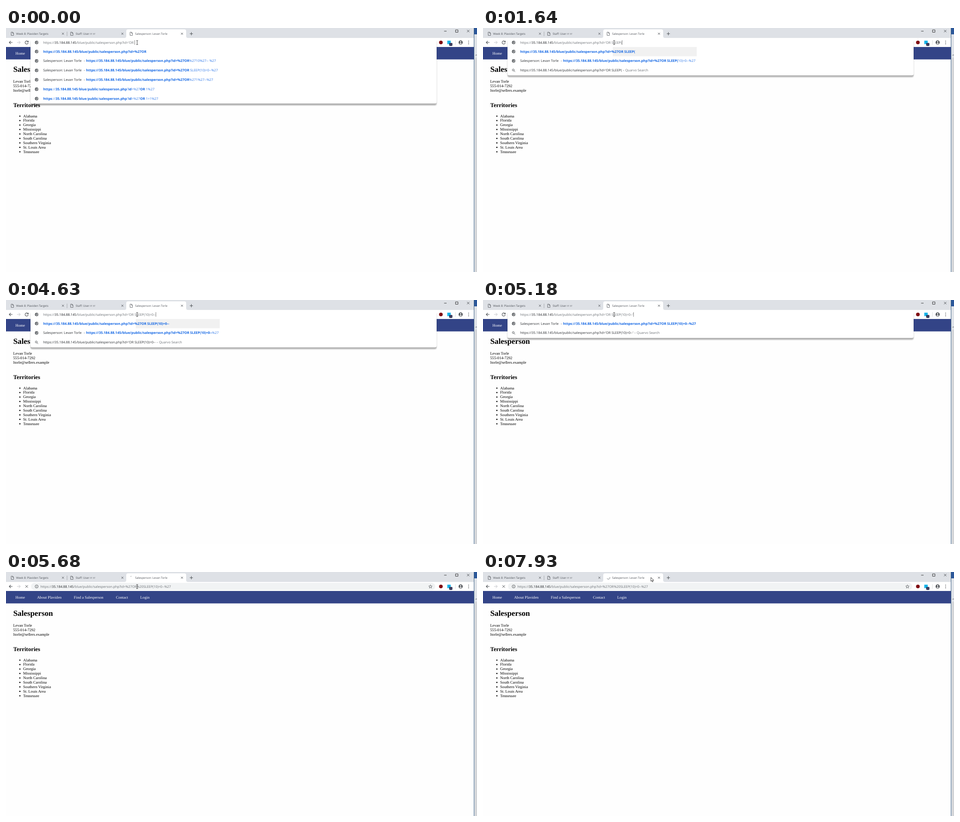
Animation, 1038 px wide and 540 px high, one loop 8000 ms. Source, as an HTML page:

```html
<!DOCTYPE html>
<html lang="en">
<head>
<meta charset="utf-8">
<title>Address bar typing</title>
<style>
html, body { margin: 0; width: 100%; height: 100%; overflow: hidden; background: #fefefe; }
svg { display: block; width: 1038px; height: 540px; }
text { white-space: pre; text-rendering: geometricPrecision; }
.ui { font-family: "Open Sans", "Noto Sans", sans-serif; font-size: 7.36px; fill: #2c2f33; }
.tab { font-family: "Open Sans", "Noto Sans", sans-serif; font-size: 6.2px; fill: #4c5056; }
.page { font-family: "Liberation Serif", "Times New Roman", serif; font-size: 8.65px; fill: #000; }
.nav { fill: #fff; }
.h1 { font-size: 17.3px; font-weight: bold; }
.h2 { font-size: 12.97px; font-weight: bold; }
.dim { fill: #6c7176; }
.host { fill: #202327; }
.link { fill: #3079e8; font-size: 7.42px; }
.hit { fill: #1266e4; font-size: 7.48px; font-weight: bold; }
.line { fill: none; stroke: #4b4f53; stroke-width: 1; }
</style>
</head>
<body>
<svg id="stage" viewBox="0 0 1038 540"></svg>
<script>
const LOOP = 8000, LOAD = 5560;
const PERSON = "Levan Torle", FIRM = "Plaviden";
const HOST = "35.184.88.145", PATH = "/blue/public/salesperson.php?id=";
const BASE = "https://" + HOST + PATH;
const TYPED = "'OR SLEEP(10)=0--'";
const ENCODED = encode(TYPED);

// time, typed characters, caret visible
const KEYS = [
  [0, 4, 1], [150, 5, 1], [290, 6, 1], [430, 7, 1], [560, 8, 1], [700, 9, 1],
  [1240, 9, 0], [1640, 10, 1], [2060, 11, 1], [2200, 12, 1], [2510, 13, 1],
  [2940, 13, 0], [3500, 13, 1], [3640, 14, 1], [3780, 15, 1],
  [4330, 15, 0], [4480, 16, 1], [4630, 17, 1], [5180, 18, 1]
];
// time, x, y, shape
const POINTER = [
  [0, 289, 32, "beam"], [7080, 293, 28, "beam"], [7220, 301, 17, "arrow"],
  [7360, 312, 5, "arrow"], [7490, 321, 1, "arrow"], [7630, 327, 9, "arrow"],
  [7780, 352, 38, "arrow"], [7930, 370, 12, "arrow"]
];
const TICKS = [5560, 5680, 5810, 5950, 6090, 6230, 6370, 6510, 6660,
  6800, 6940, 7080, 7220, 7360, 7490, 7630, 7780, 7930].map(t => [t]);

const at = (table, t) => table.filter(step => step[0] <= t).pop();
function encode(s) { return s.replace(/'/g, "%27"); }
const text = (x, y, cls, body) => `<text x="${x}" y="${y}" class="${cls}">${body}</text>`;
const rect = (x, y, w, h, fill, r = 0) =>
  `<rect x="${x}" y="${y}" width="${w}" height="${h}" rx="${r}" fill="${fill}"/>`;
const dot = (x, y, r, fill) => `<circle cx="${x}" cy="${y}" r="${r}" fill="${fill}"/>`;
const line = (d, extra = "") => `<path d="${d}" class="line" ${extra}/>`;
const span = (body, cls, x) => `<tspan class="${cls}"${x ? ` x="${x}"` : ""}>${body}</tspan>`;
const cross = (x, y, r) => line(`M${x - r} ${y - r}l${2 * r} ${2 * r}m0 ${-2 * r}l${-2 * r} ${2 * r}`);

const sheet = x => line(`M${x - 2.6} 9.2h3.3l2 2v5.2h-5.3zM${x + .5} 9.3v2.2h2.1`, 'style="stroke-width:.8"');
const globe = y => dot(67.5, y, 3.8, "#4b4f53") +
  `<path d="M64.7 ${y - .8}l2.2 1.6v1.9M66.6 ${y - 2.5}l1.6 1.2l2-.4M68.6 ${y + 2.4}l.3-1.9l1.7-.4"
    fill="none" stroke="#fff" stroke-width="1"/>`;
const lens = y => `<circle cx="66.7" cy="${y - .8}" r="2.1" class="line"/>` +
  line(`M68.2 ${y + .8}l2.6 2.6`);

function chrome() {
  const tabs = rect(0, 0, 1031, 22, "#dee1e6") +
    `<path d="M261 22q4 0 4-4v-11q0-4 4-4h124q4 0 4 4v11q0 4 4 4z" fill="#fff"/>` +
    sheet(14) + sheet(145) +
    text(22.3, 14.9, "tab", `Week 8: ${FIRM} Targets`) +
    text(153.5, 14.9, "tab", "Staff: User rr rr") +
    text(284.5, 14.9, "tab", `Salesperson: ${PERSON}`) +
    [125.5, 256.5, 387.8].map(x => cross(x, 12.6, 2)).join("") +
    rect(134, 8, .8, 10, "#9a9da2") +
    line("M405 12.7h7M408.5 9.2v7");
  const frame = line("M965.5 7h5.5M990.7 4.2h5.4v5.2h-5.4z", 'style="stroke:#222;stroke-width:.9"') +
    cross(1018.6, 6.8, 2.6);
  const bar = rect(0, 22, 1031, 20, "#fff") +
    line("M14.3 32h-7M10.5 28.6l-3.4 3.4l3.4 3.4", 'style="stroke-width:1.1"') +
    line("M24.4 32h7M28.2 28.6l3.4 3.4l-3.4 3.4", 'style="stroke:#bdc0c4"');
  const tools = dot(958.4, 32, 4.1, "#800f14") + rect(972.5, 28, 7.6, 7.6, "#18b4e8") +
    rect(977, 33.2, 6.6, 6.4, "#16163c", 1) +
    `<text x="978.9" y="38.4" class="ui" style="font-size:5px;fill:#fff">0</text>` +
    rect(990, 27, .8, 10, "#d5d7da") +
    dot(1002, 32, 4.5, "#4b4f53") + dot(1002, 30.5, 1.5, "#fff") +
    `<path d="M999.2 34.2q2.8-2.2 5.6 0q-2.8 2.8-5.6 0z" fill="#fff"/>` +
    [28.8, 32, 35.2].map(y => dot(1019.5, y, .85, "#4b4f53")).join("");
  return tabs + frame + bar + tools;
}

function page() {
  const links = [[20.8, "Home"], [68.4, `About ${FIRM}`], [149.5, "Find a Salesperson"],
    [242.2, "Contact"], [295.8, "Login"]];
  const places = ["Alabama", "Florida", "Georgia", "Mississippi", "North Carolina",
    "South Carolina", "Southern Virginia", "St. Louis Area", "Tennessee"];
  const contact = [PERSON, "555-014-7292", "ltorle@sellers.example"];
  return rect(0, 42, 1031, 27.5, "#334487") +
    links.map(([x, s]) => text(x, 59.4, "page nav", s)).join("") +
    text(16, 97.1, "page h1", "Salesperson") +
    contact.map((s, i) => text(15.8, 121.2 + 9.95 * i, "page", s)).join("") +
    text(16, 175.3, "page h2", "Territories") +
    places.map((s, i) => dot(30.6, 195.1 + 9.87 * i, 1.4, "#000") +
      text(37.8, 197.6 + 9.87 * i, "page", s)).join("");
}

function rightEdge() {
  return rect(1031, 0, 1, 540, "#3f6389") + rect(1032, 0, 6, 540, "#dfe3e8") +
    rect(1032, 0, 6, 14, "#2b579a") + rect(1033.5, 66, 4.5, 474, "#d2d4d7") +
    line("M1034.6 61l1.9-2l1.9 2", 'style="stroke-width:.9"');
}

const address = (x, query) => `<text id="url" x="${x}" y="34.5" class="ui">` +
  span("https://", "dim") + span(HOST, "host") + span(PATH + query, "dim") + "</text>";
const row = (i, icon, body) => icon(52 + 20.85 * i) + text(82, 54.6 + 20.85 * i, "ui", body);
const titled = (hit, rest) => `Salesperson: ${PERSON}` + span("–", "dim", 171) +
  span(hit, "hit", 176.5) + span(rest, "link");

// only words found in the query are bold
const words = rest => ["https", "://", HOST, "/", "blue", "/", "public", "/", "salesperson.php",
  "?", "id", "=%27", "OR", rest].map((s, i) => span(s, i % 2 ? "link" : "hit")).join("");

function suggestions(count) {
  const query = TYPED.slice(0, count);
  const code = encode(query);
  if (count === 4) {
    const hit = BASE + "%27OR";
    return [
      [globe, span(hit, "hit")],
      [globe, titled(hit, "%2710%27-- %27")],
      [globe, titled(hit, " SLEEP(10)=0--%27")],
      [globe, titled(hit, "%271%27--%27")],
      [globe, words(" 1%27")],
      [globe, words(" 1=1%27")]
    ];
  }
  const list = [
    [globe, titled(BASE + code, ENCODED.slice(code.length))],
    [lens, BASE + query + span(" – Quarvo Search", "dim")]
  ];
  if (count < TYPED.length) list.unshift([globe, span(BASE + code, "hit")]);
  return list;
}

function typing(count) {
  const list = suggestions(count);
  const shade = list.length === 3 ? rect(286, 42, 185, 20.5, "#f1f1f1") : "";
  return `<g filter="url(#shadow)">${rect(54, 24, 895, 18 + 20.83 * list.length, "#fff", 4)}</g>` +
    shade + globe(32) + address(82, TYPED.slice(0, count)) +
    list.map(([icon, body], i) => row(i, icon, body)).join("") +
    line("M48.5 30.2a3.5 3.5 0 1 0 .5 2.6M49.2 28.3v2.7h-2.8", 'style="stroke-width:1.1"') +
    sheet(276);
}

function loading() {
  return rect(55, 24, 891, 16, "#f1f3f4", 8) +
    '<circle cx="67.5" cy="32" r="3.4" class="line" style="stroke-width:.9"/>' +
    line("M67.5 31.4v2.4M67.5 29.8v.8", 'style="stroke-width:.9"') +
    address(76, encode(TYPED).replace(" ", "%20")) +
    line("M935.4 28.4l1.1 2.5l2.7.2l-2.1 1.8l.7 2.7l-2.4-1.5l-2.4 1.5l.7-2.7l-2.1-1.8l2.7-.2z",
      'style="stroke-width:.8"') +
    cross(45.5, 32, 2.8);
}

// Counter-clockwise arc; its tail waits at the top for half a turn.
function spinner(age) {
  const sweep = 360 * age / 1320;
  const point = deg => {
    const a = deg * Math.PI / 180;
    return `${276.4 + 3.3 * Math.cos(a)} ${12.7 - 3.3 * Math.sin(a)}`;
  };
  const tail = 90 + Math.max(0, sweep - 180);
  return line(`M${point(tail)}A3.3 3.3 0 0 0 ${point(90 + sweep)}`, 'style="stroke:#7b7f84"');
}

function pointer(x, y, shape) {
  const d = shape === "beam"
    ? "M-2 -4.3h1.4l.6 .6l.6 -.6h1.4M0 -3.7v7.8M-2 4.7h1.4l.6 -.6l.6 .6h1.4"
    : "M0 0v8.6l2-1.8l1.5 3.2l1.4-.6l-1.4-3.1h2.8z";
  const fill = shape === "beam" ? "none" : "#fff";
  return `<path transform="translate(${x} ${y})" d="${d}" fill="${fill}" stroke="#111" stroke-width=".8"/>`;
}

const stage = document.getElementById("stage");
stage.innerHTML = `<defs><filter id="shadow" x="-2%" y="-20%" width="104%" height="150%">
    <feDropShadow dx="0" dy="4.2" stdDeviation="1.2" flood-color="#000" flood-opacity=".3"/>
  </filter></defs>` + rect(0, 0, 1038, 540, "#fefefe") + page() + chrome() + rightEdge() +
  '<g id="bar"></g><g id="extra"></g>';
const bar = document.getElementById("bar");
const extra = document.getElementById("extra");
let barKey, extraKey;

function draw(t) {
  const busy = t >= LOAD;
  const [, count, caret] = at(KEYS, t);
  const [, x, y, shape] = at(POINTER, t);
  const tick = busy ? at(TICKS, t)[0] : 0;
  const nextBar = busy ? "busy" : count;
  if (nextBar !== barKey) {
    barKey = nextBar;
    bar.innerHTML = busy ? loading() : typing(count);
  }
  const nextExtra = [nextBar, caret, x, y, tick].join();
  if (nextExtra === extraKey) return;
  extraKey = nextExtra;
  const end = 82 + document.getElementById("url").getComputedTextLength();
  const mark = busy ? spinner(tick - LOAD + 20) : caret ? rect(end + .2, 27, .7, 10, "#444") : "";
  extra.innerHTML = mark + pointer(x, y, shape);
}

const start = performance.now();
function frame() {
  draw((performance.now() - start) % LOOP);
  requestAnimationFrame(frame);
}
frame();
</script>
</body>
</html>
```
